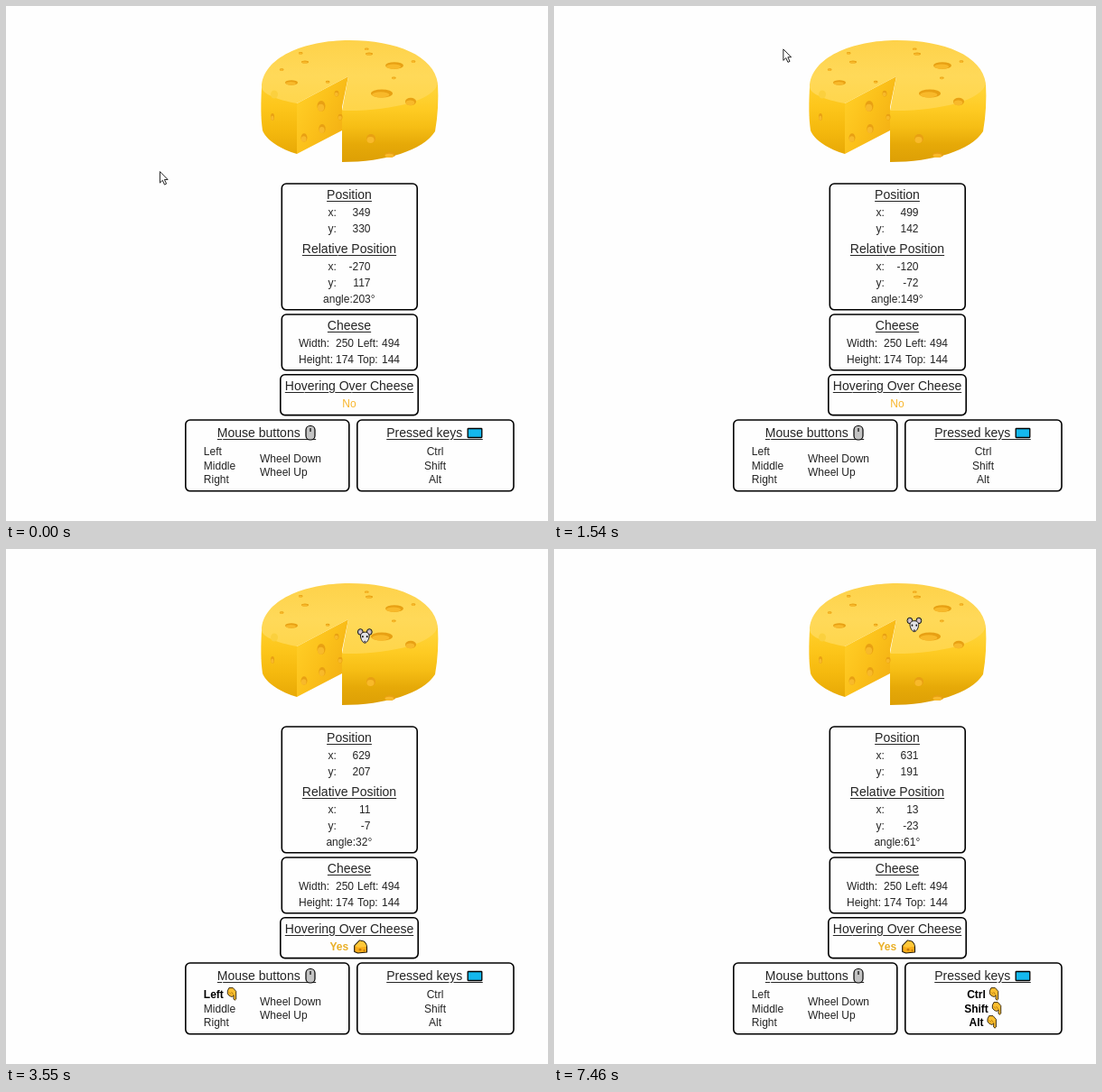
Recreate the animation shown at these times as an HTML page with a canvas. Size 600 px wide and 571 px high, loop 8000 ms.

```html
<!DOCTYPE html>
<html lang="en">
<head>
<meta charset="utf-8">
<title>Mouse and cheese</title>
<style>
html, body { margin: 0; width: 100%; height: 100%; overflow: hidden; background: #fefefe; }
canvas { display: block; width: 600px; height: 571px; }
</style>
</head>
<body>
<canvas id="stage"></canvas>
<script>
const W = 600, H = 571, LOOP = 8000, STEP = 65.1;
const SCALE = 0.78;
const BOX = { left: 494, top: 144, width: 250, height: 174 };
const CENTER = { x: 618.5, y: 213.5 };
const FONT = '"Liberation Sans", Arial, sans-serif';
const INK = '#242424', PAPER = '#fefefe';
const canvas = document.getElementById('stage');
const ratio = window.devicePixelRatio || 1;
canvas.width = W * ratio;
canvas.height = H * ratio;
const ctx = canvas.getContext('2d');

// Key points of the pointer's sweep in page units: [step, x, y]
const PATH = [
  [-1, 349, 330], [11, 590, 250], [15, 635, 190], [16, 635, 190],
  [20, 573, 127], [26, 350, 212], [29, 379, 311], [30, 398, 320],
  [40, 615, 243], [41, 615, 243], [44, 629, 207]
];

function slope(i, axis) {
  const a = PATH[Math.max(i - 1, 0)], b = PATH[Math.min(i + 1, PATH.length - 1)];
  return (b[axis] - a[axis]) / (b[0] - a[0]);
}

// Smooth curve through the key points
function pathAt(step) {
  const last = PATH.length - 1;
  const s = Math.min(Math.max(step, PATH[0][0]), PATH[last][0]);
  const i = Math.max(PATH.findIndex(p => p[0] >= s) - 1, 0);
  const a = PATH[i], b = PATH[i + 1], span = b[0] - a[0];
  const u = (s - a[0]) / span, v = 1 - u;
  const mix = axis => Math.round(
    v * v * (1 + 2 * u) * a[axis] + u * u * (3 - 2 * u) * b[axis] +
    u * v * span * (v * slope(i, axis) - u * slope(i + 1, axis)));
  return { x: mix(1), y: mix(2) };
}

// The readout trails the pointer by one step.
function pointerAt(t, lag) {
  if (t >= 6020) return { x: 631, y: 191 };
  if (t >= 4030) return { x: 630, y: 206 };
  const step = t < 50 ? -1 : Math.floor((t - 40) / STEP);
  return pathAt(step - lag);
}

const isOver = p => p.x >= BOX.left && p.x <= BOX.left + BOX.width &&
  p.y >= BOX.top && p.y <= BOX.top + BOX.height;

function text(str, x, y, o = {}) {
  ctx.font = (o.bold ? 'bold ' : '') + (o.size || 12) + 'px ' + FONT;
  ctx.textAlign = o.align || 'left';
  ctx.fillStyle = o.color || INK;
  ctx.fillText(str, x, y);
  return ctx.measureText(str).width;
}

// Underlined title; the line leaves gaps around descenders and runs under an icon
function heading(str, center, y, iconSpace = 0) {
  ctx.font = '14px ' + FONT;
  const width = ctx.measureText(str).width + iconSpace;
  const left = center - width / 2;
  ctx.fillStyle = INK;
  ctx.fillRect(left, y + 2, width, 1);
  ctx.save();
  ctx.beginPath();
  ctx.rect(left, y + 1, width, 4);
  ctx.clip();
  ctx.textAlign = 'left';
  ctx.strokeStyle = PAPER;
  ctx.lineWidth = 2.4;
  ctx.strokeText(str, left, y);
  ctx.restore();
  text(str, left, y, { size: 14 });
}

function rounded(x, y, w, h, r, fill, width) {
  ctx.beginPath();
  ctx.roundRect(x, y, w, h, r);
  ctx.fillStyle = fill;
  ctx.fill();
  ctx.strokeStyle = '#000';
  ctx.lineWidth = width;
  ctx.stroke();
}

const panel = (x, y, right, bottom) => rounded(x, y, right - x, bottom - y, 5, PAPER, 1.6);

function shape(d, fill, stroke, width = 1) {
  const p = new Path2D(d);
  if (fill) { ctx.fillStyle = fill; ctx.fill(p); }
  if (stroke) {
    ctx.strokeStyle = stroke;
    ctx.lineWidth = width;
    ctx.lineJoin = 'round';
    ctx.stroke(p);
  }
}

function oval(x, y, rx, ry, fill, stroke) {
  ctx.beginPath();
  ctx.ellipse(x, y, rx, ry, 0, 0, 7);
  ctx.fillStyle = fill;
  ctx.fill();
  if (stroke) { ctx.strokeStyle = stroke; ctx.lineWidth = 1; ctx.stroke(); }
}

function at(x, y, draw, turn = 0) {
  ctx.save();
  ctx.translate(x, y);
  ctx.rotate(turn);
  draw();
  ctx.restore();
}

function fade(x0, y0, x1, y1, ...colors) {
  const g = ctx.createLinearGradient(x0, y0, x1, y1);
  colors.forEach((c, i) => g.addColorStop(i / (colors.length - 1), c));
  return g;
}

// A dent with a lit inner side; flat sets its height relative to its width
function hole(x, y, r, flat) {
  oval(x, y, r, r * flat, '#e8a013');
  oval(x - r * 0.1, y + r * flat * 0.3, r * 0.8, r * flat * 0.68, '#f8b92a');
}

function cheese() {
  shape('M283 90C282 110 282 124 284 138C288 149 305 159 322 164V106Z',
    fade(0, 85, 0, 164, '#ffd02d', '#fdc61b', '#f5b90e', '#e8a906'));
  shape('M379 78L322 108V164L372 138V112Z',
    fade(322, 110, 374, 135, '#ffcc25', '#fbc01a', '#f4b214'));
  shape('M372 115C420 115 466 104 478 86C479 104 478 122 475 139C462 160 420 173 372 173Z',
    fade(0, 95, 0, 173, '#ffd336', '#fecb23', '#f6be15', '#e6a908', '#dd9f05'));
  shape('M322 108C301 104 284 98 283 90C284 57 330 38 380 38C432 38 474 55 478 86' +
    'C474 104 428 117 372 116L379 78Z', fade(0, 38, 0, 117, '#fed24a', '#ffd959', '#ffd549'));

  const top = [[316, 85, 7], [331, 62, 4], [402, 53, 4], [430, 66, 10], [416, 97, 12]];
  const wall = [[349, 111, 4.5], [366, 97, 2.5], [350, 136, 3.7], [330, 146, 3.5], [370, 123, 2.5]];
  top.forEach(([x, y, r]) => hole(x, y, r, 0.38));
  wall.forEach(([x, y, r]) => hole(x, y, r, 1.35));
  for (let i = 0; i < 6; i++) {
    const a = 2.9 + i * 1.05;
    hole(378 + 75 * Math.cos(a), 66 + 19 * Math.sin(a), 2.4, 0.55);
  }
  hole(404, 147, 5, 1);
  hole(425, 165, 6, 0.5);
  hole(295, 123, 2, 2);
  hole(448, 106, 6, 0.7);
  oval(297, 98, 4, 4.5, '#fbd03e');
}

function mouseFace() {
  for (const s of [-1, 1]) {
    oval(s * 5, -4.2, 2.9, 3.3, '#b4b0b6', '#161616');
    oval(s * 4.8, -3.8, 1.4, 1.8, '#dcc3cb');
  }
  shape('M0-4C4-4 5.4-1 4.6 2C4 5 2 8 0 8C-2 8-4 5-4.6 2C-5.4-1-4-4 0-4Z', '#e2e2e5', '#161616');
  for (const s of [-1, 1]) oval(s * 2.4, 1, 0.9, 1.1, '#111');
  oval(0, 6.6, 1.1, 0.9, '#55474c');
}

function arrow() {
  shape('M.5.5V13L3.4 10.2L5.6 15L7.7 14L5.5 9.4H9.2Z', '#fff', '#222');
}

function hand() {
  shape('M-4.8-3.5L-3.2-6.8H1.2L4.6-3V5.6Q3.2 8 1.9 5.6V1.4L.4 3L-1.4 2.6L-3 1.8L-4.8-.4Z',
    '#fdbf2f', '#2a1e06', 0.9);
  shape('M-3-2L-1 .4M-.6-2.4L1.6.8', null, '#9a6707', 0.7);
}

function wedge() {
  shape('M-6.8-1L-1-7L3.5-6C6-4 7-1.5 7 1V6L-3 7L-6.8 5.5Z', '#f9ad19', '#1c1608', 1.1);
  shape('M-6.3-1L-1-6.4L3.5-5.4C5.5-4 6.4-2 6.4 0L-3 .8Z', '#ffc83a');
  oval(-0.5, 3.3, 1.4, 1.3, '#c57808');
  oval(4, 4, 1, 1, '#c57808');
}

function deviceIcons() {
  rounded(332, 465.5, 10, 15.5, 4.6, '#c3c3c3', 1.2);
  ctx.fillStyle = '#333';
  ctx.fillRect(336.2, 468, 1.6, 4);
  rounded(511.2, 468.5, 15.6, 10, 0.5, '#14b8ee', 1.3);
}

function toggle(label, x, row, on, o = {}) {
  const y = Math.round(498 + 15.6 * row);
  const center = o.align === 'center';
  if (!on) return text(label, x, y, o);
  ctx.font = 'bold 12px ' + FONT;
  const left = center ? x - (ctx.measureText(label).width + 15) / 2 : x;
  const w = text(label, left, y, { bold: true, color: '#000' });
  at(left + w + 9.3, y - 4.6, hand, o.up ? Math.PI : 0);
}

function pair(label, value, y) {
  text(label, 356.5, y);
  text(String(value), 403.5, y, { align: 'right' });
}

function readout(p) {
  const dx = p.x - CENTER.x, dy = p.y - CENTER.y;
  const angle = (Math.atan2(-dy, dx) * 180 / Math.PI + 360) % 360;
  heading('Position', 380, 214);
  pair('x:', p.x, 233);
  pair('y:', p.y, 251);
  heading('Relative Position', 380, 274);
  pair('x:', dx.toFixed(0), 293);
  pair('y:', dy.toFixed(0), 311);
  text('angle:' + angle.toFixed(0) + '°', 379.8, 329, { align: 'center' });

  heading('Cheese', 380, 359);
  const columns = [324, 365, 389, 416];
  const rows = [['Width:', BOX.width, 'Left:', BOX.left], ['Height:', BOX.height, 'Top:', BOX.top]];
  rows.forEach((row, i) => row.forEach((s, j) => text(String(s), columns[j], 378 + 18 * i)));

  heading('Hovering Over Cheese', 380, 426);
  if (isOver(p)) {
    text('Yes', 358.5, 445, { bold: true, color: '#e9af26' });
    at(392.5, 441, wedge);
  } else {
    text('No', 380, 445, { align: 'center', color: '#f8b62d' });
  }
}

function controls(t) {
  const during = (from, to) => t >= from && t < to;
  const centered = { align: 'center' };
  heading('Mouse buttons', 288.5, 478, 17.5);
  heading('Pressed keys', 474.5, 478, 22.5);
  deviceIcons();
  toggle('Left', 218.8, 0, during(3550, 4550));
  toggle('Middle', 218.8, 1, during(4100, 4350));
  toggle('Right', 218.8, 2, false);
  toggle('Wheel Down', 281, 0.5, during(4910, 5470));
  toggle('Wheel Up', 281, 1.5, during(5470, 5970), { up: true });
  toggle('Ctrl', 475, 0, t >= 7460, centered);
  toggle('Shift', 475, 1, t >= 6760, centered);
  toggle('Alt', 475, 2, t >= 7080, centered);
}

function draw(t) {
  ctx.setTransform(ratio, 0, 0, ratio, 0, 0);
  ctx.fillStyle = PAPER;
  ctx.fillRect(0, 0, W, H);
  cheese();
  panel(305.3, 197, 455.2, 336.8);
  panel(305.3, 342, 455.2, 403.8);
  panel(303.8, 408.8, 456.2, 453.6);
  panel(198.8, 459, 379.8, 537.8);
  panel(388.8, 459, 562, 537.8);
  readout(pointerAt(t, 1));
  controls(t);
  const p = pointerAt(t, 0);
  const x = 283 + (p.x - BOX.left) * SCALE, y = 38 + (p.y - BOX.top) * SCALE;
  if (isOver(p)) at(x + 9, y + 9, mouseFace);
  else at(x, y, arrow);
}

const start = performance.now();
function frame() {
  draw((performance.now() - start) % LOOP);
  requestAnimationFrame(frame);
}
frame();
</script>
</body>
</html>
```
